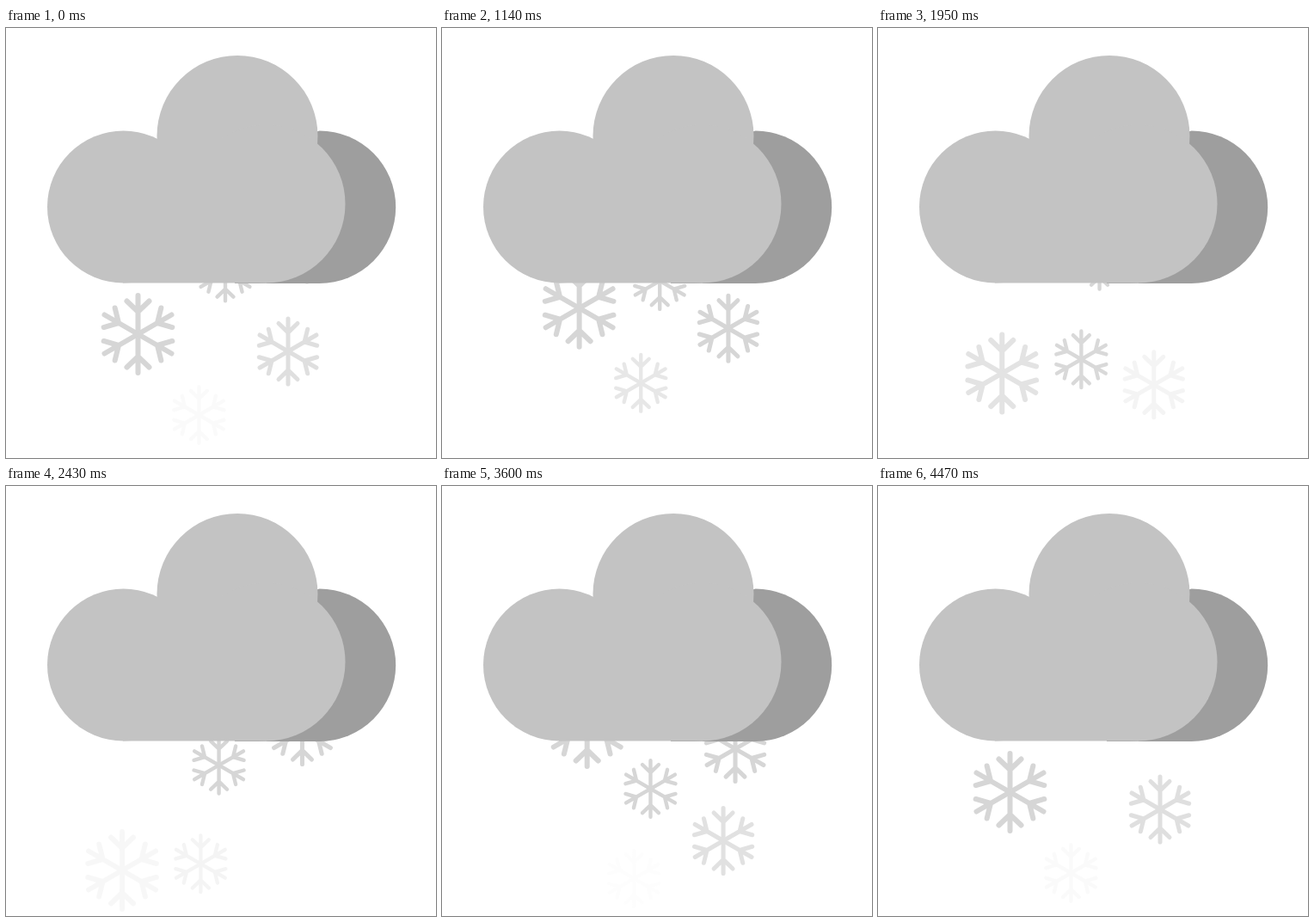
An HTML page that plays this animation: 500x500 px, repeating every 4.5 s.

```html
<!DOCTYPE html>
<html lang="en">
<head>
<meta charset="utf-8">
<title>Snow cloud</title>
<style>
  html, body { margin: 0; width: 100%; height: 100%; overflow: hidden; background: #fff; }
  svg { display: block; width: 100vw; height: 100vh; }
</style>
</head>
<body>
<svg viewBox="0 0 500 500">
  <defs>
    <g id="flake" fill="none" stroke="#d6d6d6" stroke-width="6" stroke-linecap="round" stroke-linejoin="round"></g>
  </defs>
  <g id="snow"></g>
  <path fill="#9e9e9e" d="M266 297V150L364.500 119.500A88.750 88.750 0 0 1 364.500 297Z"/>
  <g fill="#c3c3c3">
    <circle cx="136.500" cy="208" r="88.500"/>
    <circle cx="269" cy="125.500" r="93.500"/>
    <circle cx="302.500" cy="204.500" r="92"/>
    <rect x="136" y="135" width="167" height="161.500"/>
  </g>
</svg>
<script>
const LOOP = 4500, STEP = 30;
const NS = 'http://www.w3.org/2000/svg';

function add(parent, tag, attrs) {
  const el = document.createElementNS(NS, tag);
  for (const k in attrs) el.setAttribute(k, attrs[k]);
  return parent.appendChild(el);
}

const flake = document.getElementById('flake');
for (let a = 0; a < 360; a += 60) {
  add(flake, 'path', { d: 'M0 0V-45M-13 -38.500L0 -26L13 -38.500', transform: `rotate(${a})` });
}

// Piecewise linear height over age
function along(points, age) {
  let i = 1;
  while (i < points.length - 1 && age > points[i][0]) i++;
  const [t0, y0] = points[i - 1], [t1, y1] = points[i];
  return y0 + (y1 - y0) * (age - t0) / (t1 - t0);
}

// x0, y0: a point on the fall line; slant: dx per dy; fade: ages of full and no opacity
const kinds = [
  { size: 1, x0: 153.5, y0: 356, slant: -0.203, fade: [1640, 2600], starts: [-1470, 0, 3000],
    path: [[0, 246], [240, 259], [600, 281], [750, 290], [1470, 356], [2430, 447]] },
  { size: 0.844, x0: 328, y0: 376, slant: -0.185, fade: [1240, 2200], starts: [-1470, 0, 3000],
    path: [[0, 257], [1470, 376]] },
  { size: 0.844, x0: 336, y0: 347.5, slant: -0.137, fade: [1260, 2090], starts: [2100],
    path: [[330, 285.5], [1500, 412.5]] },
  { size: 0.729, x0: 255, y0: 284.5, slant: -0.185, fade: [830, 1550], starts: [-1470, 0, 1055, 2073, 3000],
    path: [[0, 284.5], [1470, 450]] }
];

const snow = document.getElementById('snow');
const flakes = kinds.flatMap(kind => kind.starts.map(start =>
  ({ kind, start, el: add(snow, 'use', { href: '#flake' }) })));

function draw(t) {
  for (const { kind, start, el } of flakes) {
    const age = t - start;
    const [full, gone] = kind.fade;
    const alpha = Math.min(1, (gone - age) / (gone - full));
    const y = along(kind.path, age);
    const visible = alpha > 0 && y > 230;
    el.setAttribute('display', visible ? 'inline' : 'none');
    if (!visible) continue;
    const x = kind.x0 + kind.slant * (y - kind.y0);
    el.setAttribute('transform', `translate(${x.toFixed(2)} ${y.toFixed(2)}) scale(${kind.size})`);
    el.setAttribute('opacity', alpha.toFixed(3));
  }
}

const begin = performance.now();
function tick() {
  const t = (performance.now() - begin) % LOOP;
  draw(Math.floor(t / STEP) * STEP);
  requestAnimationFrame(tick);
}
tick();
</script>
</body>
</html>
```
